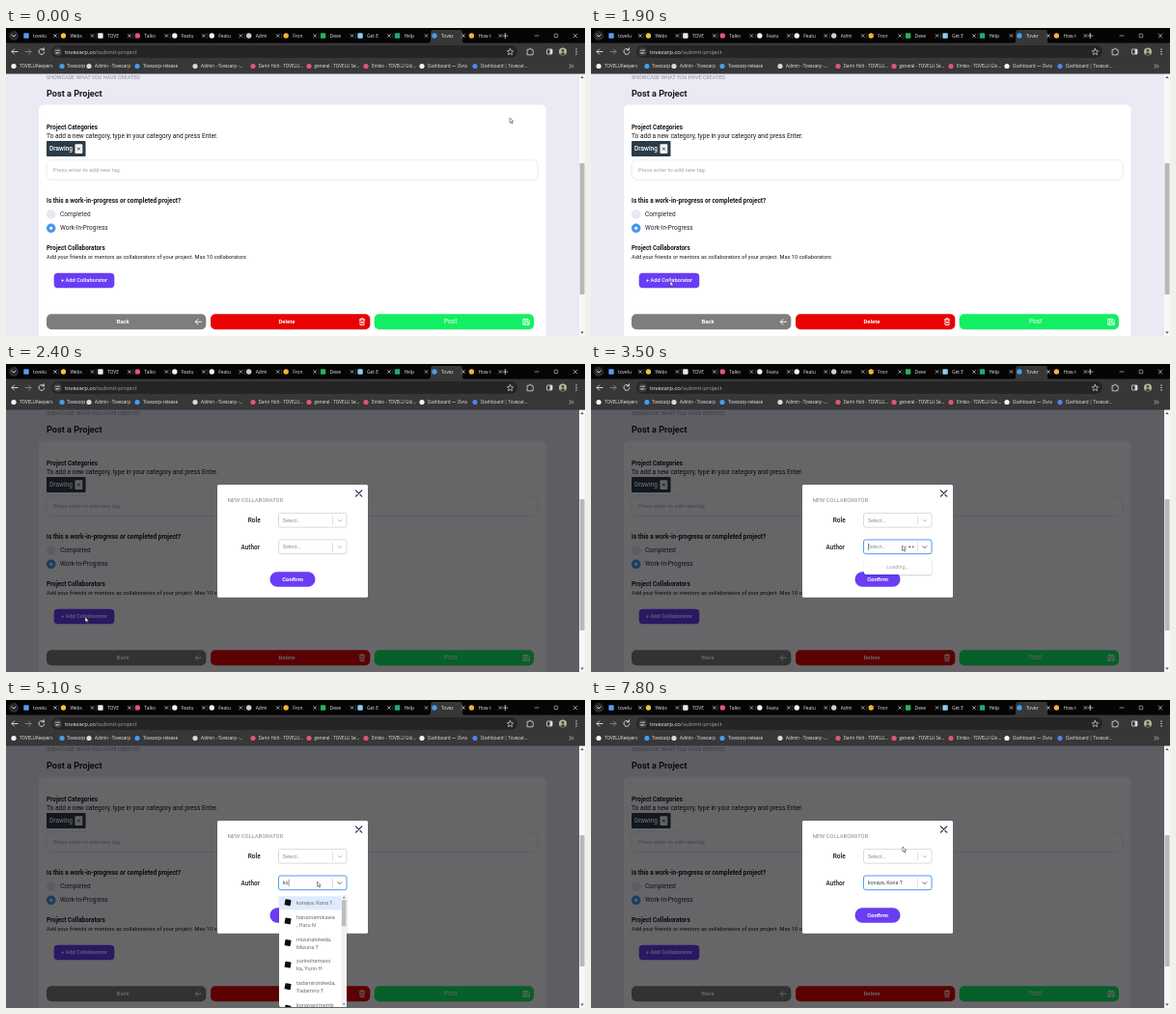
An HTML page that plays this animation: 600 by 319 pixels, repeating every 8000 ms.

```html
<!DOCTYPE html>
<html lang="en">
<head>
<meta charset="utf-8">
<title>Add a collaborator</title>
<style>
  html, body { margin: 0; width: 100%; height: 100%; overflow: hidden; background: #eaeaf5; }
  svg { display: block; width: 600px; height: 319px; }
  text { font-family: Roboto, sans-serif; white-space: pre; }
  .ui text { font-family: "Open Sans", sans-serif; }
</style>
</head>
<body>
<svg id="stage" viewBox="0 0 600 319" xmlns="http://www.w3.org/2000/svg"></svg>
<script>
const LOOP = 8000, STEP = 100;
const VIOLET = '#6a3df4', INK = '#17171c';

// Markup helpers
const box = (x, y, w, h, fill, r = 0, extra = '') =>
  `<rect x="${x}" y="${y}" width="${w}" height="${h}" rx="${r}" fill="${fill}" ${extra}/>`;
const dot = (x, y, r, fill, extra = '') =>
  `<circle cx="${x}" cy="${y}" r="${r}" fill="${fill}" ${extra}/>`;
const line = (d, color, w = 1) =>
  `<path d="${d}" fill="none" stroke="${color}" stroke-width="${w}" stroke-linecap="round" stroke-linejoin="round"/>`;
const label = (x, y, size, str, fill = INK, weight = 400, anchor = 'start', extra = '') =>
  `<text x="${x}" y="${y}" font-size="${size}" fill="${fill}" font-weight="${weight}" text-anchor="${anchor}" ${extra}>${str}</text>`;
const cross = (x, y, r, color, w) =>
  line(`M${x - r} ${y - r}l${2 * r} ${2 * r}m0 ${-2 * r}l${-2 * r} ${2 * r}`, color, w);
const group = (id, body, extra = '') => `<g id="${id}" ${extra}>${body}</g>`;

function browserBar() {
  const tabs = [
    ['tovelu', '#5b9bf0', 1], ['Webs', '#f1c52c'], ['TOVE', '#e4ecf8', 1], ['Talko', '#e0567a'],
    ['Featu', '#f2f2f2'], ['Featu', '#f2f2f2'], ['Admi', '#cfcfcf'], ['Fron', '#efb62f'],
    ['Deve', '#2fae5f', 1], ['Get E', '#8accf3', 1], ['Help', '#1fa882', 1], ['Tovez', '#3f9ff2'], ['How t', '#f0b040']
  ];
  const marks = [
    [8, 14, 'TOVELUKeepers', '#f4f4f4'], [58, 63, 'Tovezarp', '#3f9ff2'],
    [86, 92, 'Admin - Tovezarp', '#d8d8d8'], [136, 142, 'Tovezarp-release', '#3f9ff2'],
    [196, 202, 'Admin - Tovezarp -…', '#d8d8d8'], [256, 261.5, 'Darin Holt - TOVELU…', '#e0567a'],
    [314, 319.5, 'general - TOVELU Se…', '#e0567a'], [373, 379, 'Emiko - TOVELU Glo…', '#e0567a'],
    [431, 437, 'Dashboard — Ovra', '#f4f4f4'], [486, 492, 'Dashboard | Tovezar…', '#4c86e8']
  ];
  let s = box(0, 0, 600, 16, '#050505') + box(0, 15.5, 600, 32, '#373737');
  s += dot(8, 8, 5, '#2c2c2c') + line('M6 7l2 2l2 -2', '#ddd', 0.9);
  s += `<path d="M437 16q3 0 3-3v-8q0-3 3-3h27q3 0 3 3v8q0 3 3 3z" fill="#373737"/>`;
  tabs.forEach(([name, color, square], i) => {
    const x = 21 + 38.45 * i;
    s += square ? box(x - 2.7, 5.3, 5.4, 5.4, color, 0.8) : dot(x, 8, 2.7, color);
    s += label(x + 7, 9.8, 4.9, name, '#e6e6e6') + cross(x + 30, 8, 1.4, '#ddd', 0.7);
    if (i !== 10 && i !== 11) s += box(x + 33.6, 5, 0.5, 6, '#555');
  });
  s += line('M515 8h5m-2.5-2.5v5', '#ddd', 0.7);
  s += line('M548 8h4', '#ddd', 0.6) + box(568.2, 6.2, 3.6, 3.6, 'none', 0.5, 'stroke="#ddd" stroke-width=".6"');
  s += cross(590, 8, 1.9, '#ddd', 0.6);

  s += line('M12 24.5h-6m2.6-2.6l-2.6 2.6l2.6 2.6', '#e0e0e0', 0.9);
  s += line('M20 24.5h6m-2.6-2.6l2.6 2.6l-2.6 2.6', '#858585', 0.9);
  s += line('M39.2 22.6a2.9 2.9 0 1 0 .6 2.4m-.4-4.2v2h-2', '#e0e0e0', 0.9);
  s += box(47, 18, 483, 13, '#252525', 6.5) + dot(53.5, 24.5, 4.6, '#3b3b3b');
  s += line('M51.3 23.2h2.6m-2.6 2.7h1m1.7 0h1.8', '#ddd', 0.7) + dot(54.9, 23.2, 0.8, '#ddd') + dot(53, 25.9, 0.8, '#ddd');
  s += label(61, 26.7, 5.95, 'tovezarp.co<tspan fill="#a6a6a6">/submit-project</tspan>', '#f2f2f2');
  s += line('M522.5 21.4l1 2.1l2.2.3l-1.6 1.6l.4 2.2l-2-1.1l-2 1.1l.4-2.2l-1.6-1.6l2.2-.3z', '#ddd', 0.7);
  s += line('M540.5 22.3h1.6a1.1 1.1 0 0 1 2.2 0h1.6v1.7a1.1 1.1 0 0 1 0 2.1v1.7h-5.4z', '#ddd', 0.8);
  s += box(560.5, 22, 5.5, 5, 'none', 0.5, 'stroke="#ddd" stroke-width=".8"') + box(563.6, 22, 2.4, 5, '#ddd');
  s += dot(577, 24.5, 4, '#b9b49c') + dot(577, 23.4, 1.4, '#4d4237') + `<path d="M574.3 27.3q2.7-4 5.4 0q-2.7 2.2-5.4 0z" fill="#4d4237"/>`;
  s += [22, 24.5, 27].map(y => dot(591, y, 0.7, '#e6e6e6')).join('');

  marks.forEach(([ix, x, name, color]) => {
    s += dot(ix, 39.5, 2.6, color) + label(x, 41.2, 4.6, name, '#ececec');
  });
  return s + line('M584 37.8l1.6 1.7l-1.6 1.7m2.4-3.4l1.6 1.7l-1.6 1.7', '#ddd', 0.7);
}

function page() {
  const radio = (y, on) => dot(46.7, y, 4.8, on ? '#4a98e8' : '#e8e8f0') + (on ? dot(46.7, y, 1.5, '#fff') : '');
  let s = box(0, 47, 594, 272, '#eaeaf5') + box(34, 79.5, 525.5, 250, '#fff', 5);
  s += label(42, 53.2, 5.44, 'SHOWCASE WHAT YOU HAVE CREATED', '#8c8c9c');
  s += label(42, 71, 9.15, 'Post a Project', INK, 700);
  s += label(42, 105.4, 6.35, 'Project Categories', INK, 700);
  s += label(42, 114.4, 6.57, 'To add a new category, type in your category and press Enter.');
  s += box(42, 117, 40.5, 16, '#2b3c48', 0.8) + label(45, 127.4, 6.55, 'Drawing', '#fff', 500);
  s += box(71.5, 120.3, 7.8, 9.8, '#f6f6f6', 1) + cross(75.4, 125.2, 1.1, '#222', 0.8);
  s += box(42, 136.7, 509.3, 20.6, '#fff', 6, 'stroke="#e2e2ec" stroke-width=".7"');
  s += label(49, 149.2, 5.8, 'Press enter to add new tag', '#a2a2b0');
  s += label(42, 180.7, 6.45, 'Is this a work-in-progress or completed project?', INK, 700);
  s += radio(193, false) + label(56, 194.9, 6.5, 'Completed', '#25253a');
  s += radio(207.3, true) + label(56, 209, 6.5, 'Work-In-Progress', '#25253a');
  s += label(42, 230.4, 6.37, 'Project Collaborators', INK, 700);
  s += label(42, 239, 5.7, 'Add your friends or mentors as collaborators of your project. Max 10 collaborators');
  s += box(49.7, 253.7, 62.6, 15.6, VIOLET, 4) + label(81, 263.4, 5.75, '+ Add Collaborator', '#fff', 500, 'middle');

  [[42, 'Back', '#7d7d7d', 5.9, 700], [212, 'Delete', '#e80202', 5.9, 700], [381.7, 'Post', '#12ef62', 6.5, 400]]
    .forEach(([x, name, color, size, weight]) => {
      s += box(x, 296.3, 165.3, 15.9, color, 5) + label(x + 79, 306.4, size, name, '#fff', weight, 'middle');
    });
  s += line('M202.3 304.3h-6m2.7-2.7l-2.7 2.7l2.7 2.7', '#fff', 0.9);
  s += line('M366.3 302h5.4m-3.9-.3v-.9h2.4v.9m-3.2.6v5.2h4v-5.2m-2.6 1.7l1.3 1.6m0-1.6l-1.3 1.6', '#fff', 0.9);
  s += line('M536.2 301.4h4.5l1.5 1.5v4.4h-6zm1.3 0v1.9h2.8v-1.9m-3 5.9v-2.3h3.8v2.3', '#fff', 0.9);
  return s;
}

function scrollBar() {
  return box(594, 47, 6, 272, '#f8f8f8') + box(594.6, 140, 4.9, 136, '#b8b8b8') +
    '<path d="M595.3 52l1.7-2.2l1.7 2.2zM595.3 314.5l1.7 2.2l1.7-2.2z" fill="#555"/>';
}

function modal() {
  const select = (y, id) =>
    box(282.5, y, 70.5, 14.6, '#fff', 2, `id="${id}" stroke="#ccc" stroke-width=".7"`) +
    box(338, y + 2.8, 0.6, 9, '#ccc') +
    `<path id="${id}Arrow" d="M343.6 ${y + 6.4}l2.2 2.2l2.2 -2.2" fill="none" stroke="#bbb" stroke-width="1"/>`;
  let s = box(219, 125, 156, 116.7, '#fff', 1.5);
  s += label(229.7, 142.5, 5.8, 'NEW COLLABORATOR', '#858595') + cross(365.6, 134, 3.2, '#1d2c50', 1.2);
  s += label(250.7, 164.2, 6.55, 'Role', INK, 500) + label(243.6, 191.7, 6.35, 'Author', INK, 500);
  s += select(154.5, 'role') + label(286.7, 163.9, 5.4, 'Select...', '#909090');
  s += select(182, 'author') + label(286.7, 191.4, 5.4, 'Select...', '#909090', 400, 'start', 'id="value"');
  s += box(287, 185.6, 0.5, 7.6, '#333', 0, 'id="caret"');
  s += group('dots', [326, 330.2, 333.8].map(x => dot(x, 189.3, 0.9, '#333')).join(''));
  s += box(273.5, 215.2, 47, 15.6, VIOLET, 7.8) + label(297, 225.2, 6, 'Confirm', '#fff', 700, 'middle');
  return s;
}

const panel = h => box(282.6, 202.6, 71, h + 0.8, '#000', 2.5, 'opacity=".13"') + box(283, 202, 70, h, '#fff', 2);

function optionList() {
  const people = [
    ['konaya, Kona T'], ['haruonemikawa', ', Haru N'], ['mizunatokeda,', 'Mizuna T'],
    ['yurinohamaso', 'ka, Yurin H'], ['tadamirotokeda,', 'Tadamiro T'], ['konayan(memb', 'er), Kona Y']
  ];
  let s = panel(116) + box(283, 203.2, 64.5, 14.2, '#deebff');
  people.forEach((rows, i) => {
    const y = i ? 206.6 + 22.6 * i : 210;
    s += box(288.9, y - 3.4, 6.2, 6.2, '#0c0c0c', 0.8, `transform="rotate(10 292 ${y})"`);
    rows.forEach((row, k) => {
      s += label(301, y + (i ? -2 + 7.9 * k : 2), 5.6, row, '#6c6c6c');
    });
  });
  s += box(347.3, 202, 5.7, 116, '#f3f3f3') + box(347.9, 207.2, 4.5, 27, '#bdbdbd');
  return s + '<path d="M348.8 205.3l1.4-1.8l1.4 1.8zM348.8 314.2l1.4 1.8l1.4-1.8z" fill="#666"/>';
}

const stage = document.getElementById('stage');
stage.innerHTML =
  '<defs><clipPath id="view"><rect y="47" width="600" height="272"/></clipPath>' +
  '<clipPath id="menuClip"><rect x="280" y="200" width="76" height="118"/></clipPath></defs>' +
  group('content', page(), 'clip-path="url(#view)"') +
  box(0, 47, 594, 272, '#000004', 0, 'id="shade"') +
  scrollBar() +
  group('bar', browserBar(), 'class="ui"') +
  group('modal', modal()) +
  group('loading', panel(16) + label(318, 211.9, 5.4, 'Loading...', '#a0a0a0', 400, 'middle')) +
  group('options', optionList(), 'clip-path="url(#menuClip)"') +
  group('cursor', '<path d="M0 0v5.2l1.2-1l.9 1.9l.9-.4l-.9-1.8h1.6z" fill="#fff" stroke="#222" stroke-width=".5"/>');

const $ = id => document.getElementById(id);
const show = (id, on) => $(id).setAttribute('display', on ? 'inline' : 'none');
const set = (id, attrs) => Object.entries(attrs).forEach(([k, v]) => $(id).setAttribute(k, v));

// Timeline, in ms
const FOCUS = 3100, KEY_1 = 4500, KEY_2 = 4700, LOADED = 4800, PICK = 6500;
const PATH = [[0, 522, 93], [1100, 522, 93], [1900, 82, 262], [2500, 82, 262], [3000, 322.5, 188],
  [5500, 322.5, 188], [6100, 322, 208], [6900, 322, 208], [7500, 323, 152], [LOOP, 323, 152]];
const FADE = [[0, 0], [2100, 0], [2200, 0.23], [2300, 0.75], [2400, 1], [LOOP, 1]];
const SHADE = 0.6;
const smooth = p => p * p * (3 - 2 * p);

function sample(keys, t, ease = p => p) {
  const i = keys.findIndex(k => k[0] > t);
  const a = keys[i - 1], b = keys[i];
  const p = ease((t - a[0]) / (b[0] - a[0]));
  return a.slice(1).map((v, k) => v + (b[k + 1] - v) * p);
}

function draw(t) {
  const [x, y] = sample(PATH, t, smooth);
  const [fade] = sample(FADE, t);
  set('cursor', { transform: `translate(${x} ${y})` });
  set('shade', { opacity: SHADE * Math.pow(fade, 0.8) });

  const scale = 0.8 + 0.2 * fade;
  set('modal', { opacity: fade, transform: `translate(297 183.3) scale(${scale}) translate(-297 -183.3)` });

  const focused = t >= FOCUS, picked = t >= PICK;
  const waiting = focused && t < LOADED;
  set('author', { stroke: focused ? '#3f90f2' : '#ccc', 'stroke-width': focused ? 0.9 : 0.7 });
  set('authorArrow', { stroke: focused ? '#5c5c5c' : '#bbb' });
  show('loading', waiting);
  show('dots', waiting);
  show('options', t >= LOADED && !picked);

  const typed = t < KEY_1 ? '' : t < KEY_2 ? 'k' : 'ko';
  $('value').textContent = picked ? 'konaya, Kona T' : typed || 'Select...';
  set('value', { fill: picked || typed ? '#444' : '#909090' });

  const lastKey = t >= KEY_2 ? KEY_2 : t >= KEY_1 ? KEY_1 : FOCUS;
  show('caret', focused && !picked && (t - lastKey) % 1000 < 500);
  set('caret', { x: 287 + (typed ? $('value').getComputedTextLength() : 0) });

  [...$('dots').children].forEach((d, i) => {
    const p = ((t - FOCUS + 1200 - 160 * i) % 1000) / 1000;
    d.setAttribute('opacity', smooth(Math.max(0, 1 - Math.abs(p - 0.4) / 0.4)));
  });
}

const start = performance.now();
function tick() {
  const t = (performance.now() - start) % LOOP;
  draw(Math.floor(t / STEP) * STEP);
  requestAnimationFrame(tick);
}
tick();
</script>
</body>
</html>
```
